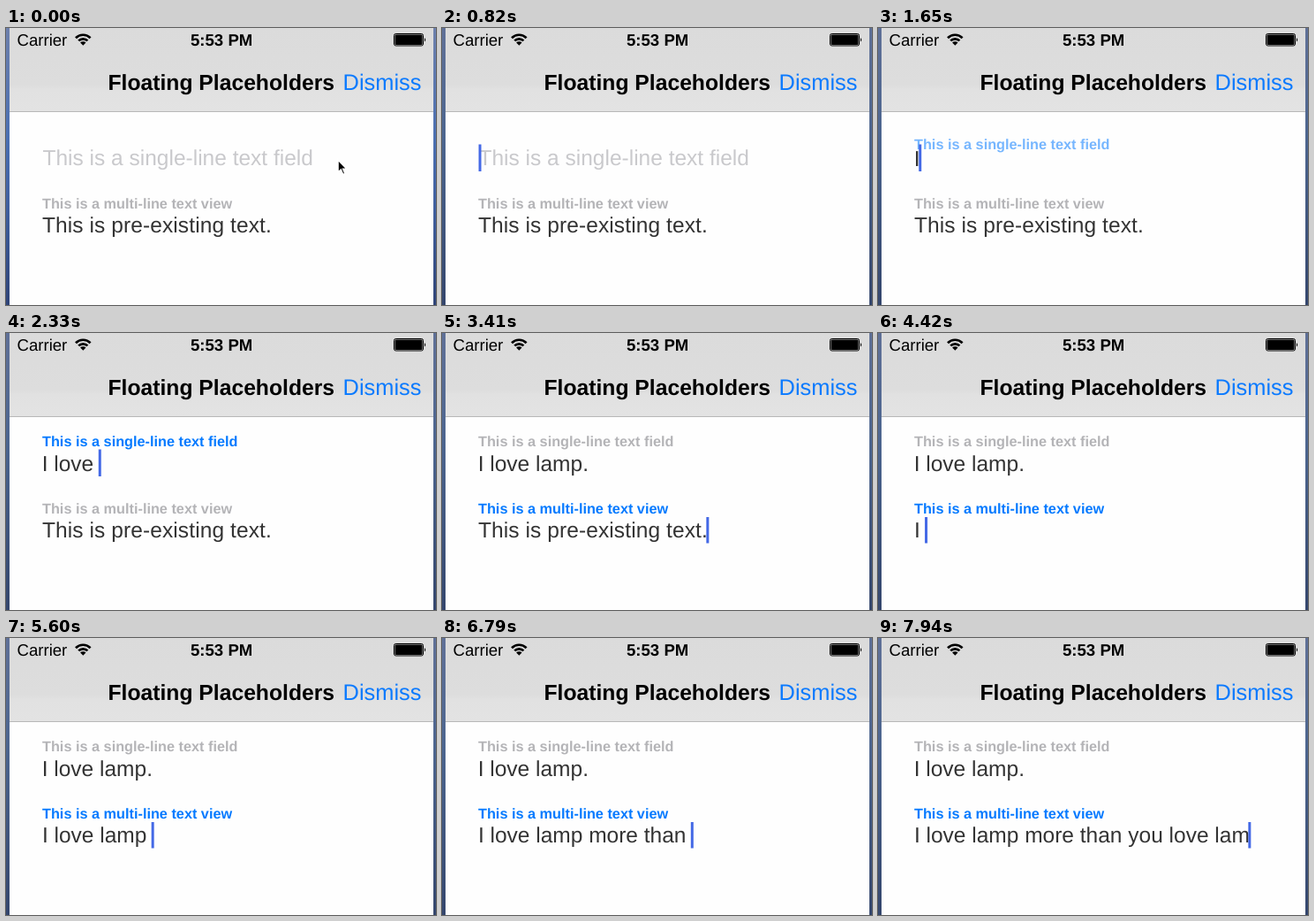
Animation of 487 by 313 pixels, one loop 8000 ms. Source, as an HTML page:

```html
<!DOCTYPE html>
<html lang="en">
<head>
<meta charset="utf-8">
<title>Floating Placeholders</title>
<style>
  html, body { margin: 0; width: 100%; height: 100%; overflow: hidden; background: #fefefe; }
  svg { display: block; width: 487px; height: 313px; }
  text {
    font-family: "Liberation Sans", Arial, sans-serif;
    text-rendering: geometricPrecision;
    white-space: pre;
  }
  .status { font-size: 18.6px; }
  .title { font-size: 24.7px; }
  .action { font-size: 25.4px; fill: #0a7aff; }
  .bold, .label { font-weight: bold; }
  .label { font-size: 16.27px; }
  .field { font-size: 24.5px; fill: #333; }
  .hint { fill: #c9c9cc; }
  .caret, .grip { fill: #4469e6; }
</style>
</head>
<body>
<svg viewBox="0 0 487 313">
  <defs>
    <linearGradient id="bar" x2="0" y2="1">
      <stop offset="0" stop-color="#dbdbdb"/>
      <stop offset=".68" stop-color="#dddddd"/>
      <stop offset=".74" stop-color="#e1e1e1"/>
      <stop offset="1" stop-color="#e3e3e3"/>
    </linearGradient>
    <linearGradient id="bright" x2="0" y2="1">
      <stop offset="0" stop-color="#6d80ac"/>
      <stop offset=".4" stop-color="#4a6fb2"/>
      <stop offset=".65" stop-color="#3f5f9f"/>
      <stop offset="1" stop-color="#2f4478"/>
    </linearGradient>
    <linearGradient id="dull" x2="0" y2="1">
      <stop offset="0" stop-color="#5f7097"/>
      <stop offset=".4" stop-color="#4c658f"/>
      <stop offset="1" stop-color="#34466d"/>
    </linearGradient>
  </defs>

  <rect id="desk" width="487" height="313" fill="url(#bright)"/>
  <rect x="4" width="480" height="313" fill="#fefefe"/>
  <rect x="4" width="480" height="94" fill="url(#bar)"/>
  <rect x="4" y="94" width="480" height="1" fill="#b8b8b8"/>

  <text class="status" x="12.5" y="20">Carrier</text>
  <g fill="none" stroke="#000" stroke-width="2.7">
    <path d="M79 11.2a11.7 11.7 0 0 1 16.6 0M82.2 14.4a7.2 7.2 0 0 1 10.2 0"/>
    <path d="M87.3 19.7l-3.2-3.2a4.5 4.5 0 0 1 6.4 0z" fill="#000" stroke="none"/>
  </g>
  <text class="status bold" x="209" y="20">5:53 PM</text>
  <rect x="439.5" y="6.5" width="33" height="13.5" rx="2" fill="none" stroke="#000"/>
  <rect x="440.5" y="7.5" width="31" height="11.5" rx="1"/>
  <path d="M474 11q2.4 2.3 0 4.6z"/>
  <text class="title bold" x="115.5" y="70">Floating Placeholders</text>
  <text class="action" x="381.6" y="70">Dismiss</text>

  <text id="hint1" class="field hint" x="41.5" y="155">This is a single-line text field</text>
  <text id="label1" class="label" x="41" y="127.7">This is a single-line text field</text>
  <text id="text1" class="field" x="40.7" y="155.6" xml:space="preserve"></text>
  <rect id="caret1" class="caret" y="131.5" width="3" height="30.5"/>

  <g id="selection">
    <rect x="41" y="208" width="261" height="30" fill="#ccddee"/>
    <g class="grip">
      <rect x="40" y="203" width="3" height="35"/>
      <circle cx="41.5" cy="199.5" r="7.5"/>
      <rect x="300" y="208" width="3" height="35"/>
      <circle cx="301.5" cy="245.5" r="7.5"/>
    </g>
  </g>
  <text id="hint2" class="field hint" x="41.5" y="231">This is a multi-line text view</text>
  <text id="label2" class="label" x="41" y="204">This is a multi-line text view</text>
  <text id="text2" class="field" x="40.9" y="231" xml:space="preserve"></text>
  <rect id="caret2" class="caret" y="208" width="3" height="29.5"/>

  <path id="pointer" d="M0 0V14L3.3 11L5.7 16.5L8 15.5L5.7 10.2H10Z" stroke="#fff" stroke-width="1.6"/>
</svg>
<script>
  const LOOP = 8000;
  const FOCUS = 540, SWITCH = 3220, SELECT = 3680, CLEAR = 3940;
  const TYPE1 = 1560, TYPE2 = 4230;
  const GREY = [180, 180, 183], BLUE = [5, 122, 255];
  const PREFILLED = "This is pre-existing text.";

  // Each burst: first key time, last key time, characters.
  const line1 = [
    [TYPE1, 1720, "I "], [1930, 1930, "l"], [2110, 2330, "ove "],
    [2480, 2600, "lam"], [2770, 2770, "p"], [2950, 2950, "."]
  ];
  const line2 = [
    [TYPE2, 4390, "I "], [4600, 4600, "l"], [4780, 4980, "ove "],
    [5130, 5280, "lam"], [5420, 5420, "p"], [5600, 5600, " "],
    [5780, 6090, "more "], [6240, 6290, "th"], [6470, 6550, "an"],
    [6730, 7050, " you "], [7230, 7230, "l"], [7410, 7620, "ove "],
    [7800, 7940, "lam"]
  ];

  const el = {};
  for (const node of document.querySelectorAll("svg [id]")) el[node.id] = node;

  const ramp = (t, a, b) => Math.min(1, Math.max(0, (t - a) / (b - a)));
  const ease = (t, a, b) => { const p = ramp(t, a, b); return p * p * (3 - 2 * p); };
  const mix = (a, b, p) => `rgb(${a.map((v, i) => Math.round(v + (b[i] - v) * p))})`;
  const fade = (node, alpha) => node.setAttribute("opacity", alpha);

  function typed(bursts, t) {
    let out = "";
    for (const [from, to, chars] of bursts) {
      const gap = (to - from) / Math.max(1, chars.length - 1);
      [...chars].forEach((c, i) => { if (t >= from + gap * i - 1) out += c; });
    }
    return out;
  }

  function setLine(n, value, emptyX) {
    const text = el["text" + n];
    if (text.textContent !== value) text.textContent = value;
    text.style.letterSpacing = value === PREFILLED ? ".1px" : "0";
    const x = value ? 39.4 + text.getComputedTextLength() : emptyX;
    el["caret" + n].setAttribute("x", x);
  }

  // up: 0 = lowered and hidden, 1 = floating above the line
  function setLabel(n, up, blue) {
    const label = el["label" + n];
    fade(label, up);
    label.setAttribute("transform", `translate(0 ${20 * (1 - up)})`);
    label.setAttribute("fill", mix(GREY, BLUE, blue));
  }

  function draw(t) {
    const swap = ramp(t, SWITCH - 20, SWITCH + 180);

    el.desk.setAttribute("fill", t < FOCUS ? "url(#bright)" : "url(#dull)");

    const p = ease(t, 0, 240);
    const x = 376 - 47 * p, y = 149 - 4 * p + 5 * Math.sin(Math.PI * p);
    el.pointer.setAttribute("transform", `translate(${x} ${y})`);
    fade(el.pointer, t < FOCUS ? 1 : 0);

    setLine(1, typed(line1, t), 41.5);
    setLabel(1, ease(t, TYPE1 - 20, TYPE1 + 190), 1 - swap);
    fade(el.hint1, t < TYPE1 ? 1 : 0);
    let caret1 = ramp(t, FOCUS - 40, FOCUS + 280) * (1 - ramp(t, 1130, 1300));
    if (t < FOCUS || t >= SWITCH) caret1 = 0;
    else if (t >= TYPE1) caret1 = 1;
    fade(el.caret1, caret1);

    setLine(2, t < CLEAR ? PREFILLED : typed(line2, t), 40);
    const up2 = t < TYPE2 - 20
      ? 1 - ease(t, CLEAR, CLEAR + 210)
      : ease(t, TYPE2 - 20, TYPE2 + 190);
    setLabel(2, up2, swap);
    fade(el.hint2, t >= CLEAR + 180 && t < TYPE2 ? 1 : 0);
    const selected = t >= SELECT && t < CLEAR;
    fade(el.selection, selected ? 1 : 0);
    fade(el.caret2, selected ? 0 : swap);
  }

  const start = performance.now();
  function tick() {
    draw((performance.now() - start) % LOOP);
    requestAnimationFrame(tick);
  }
  tick();
</script>
</body>
</html>
```
